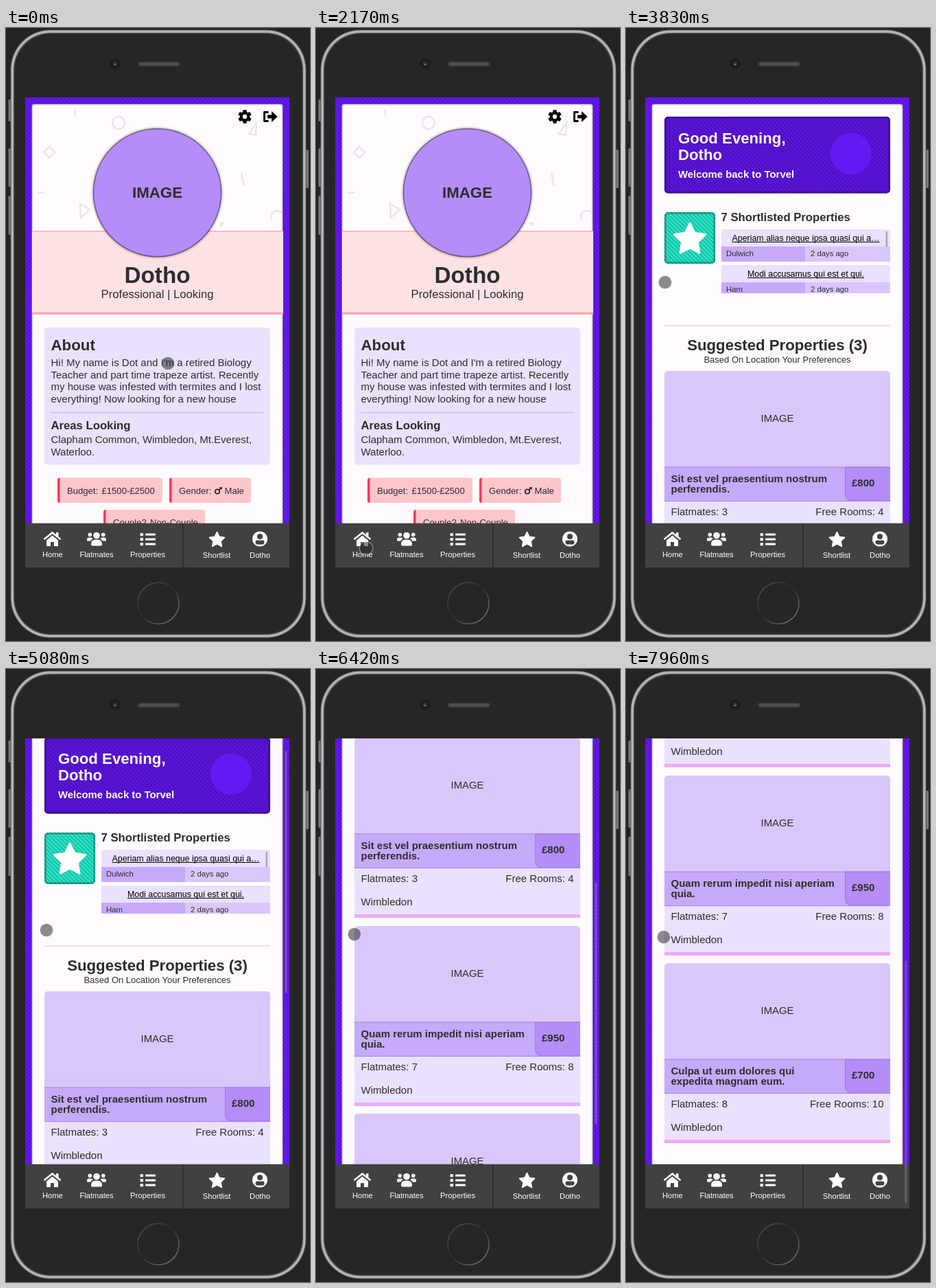
Write an HTML page with a canvas that moves like this. It is 443 by 892 pixels and loops after 8 s.

```html
<!DOCTYPE html>
<html lang="en">
<head>
<meta charset="utf-8">
<title>Flatmate app</title>
<style>
  html, body { margin: 0; width: 443px; height: 892px; overflow: hidden; background: #242424; }
  canvas { display: block; width: 443px; height: 892px; }
</style>
</head>
<body>
<canvas id="stage"></canvas>
<script>
const W = 443, H = 892, LOOP = 8000;
const canvas = document.getElementById('stage');
const dpr = window.devicePixelRatio || 1;
canvas.width = W * dpr;
canvas.height = H * dpr;
const c = canvas.getContext('2d');

const INK = '#2d2d2d', PAPER = '#fffbff', NAV = '#414141';
const PALE = '#eae1fe', LILAC = '#d9c7fc', MID = '#c6aafa', DEEP = '#b48df8';
const USER = 'Dotho';

const homes = [
  { title: ['Sit est vel praesentium nostrum', 'perferendis.'], price: '£800', mates: 3, rooms: 4 },
  { title: ['Quam rerum impedit nisi aperiam', 'quia.'], price: '£950', mates: 7, rooms: 8 },
  { title: ['Culpa ut eum dolores qui', 'expedita magnam eum.'], price: '£700', mates: 8, rooms: 10 }
];

// Pointer moves: start, end, from, control point, to
const moves = [
  [290, 540, 236, 488, 260, 515, 206, 535],
  [990, 1000, 206, 535, 209, 533, 212, 531],
  [1540, 2170, 212, 531, 330, 815, 73, 757],
  [2880, 3330, 73, 757, 130, 907, 218, 712],
  [3350, 3630, 218, 712, 165, 560, 107, 422],
  [3750, 3830, 107, 422, 80, 390, 57, 370],
  [4830, 5010, 57, 370, 58, 375, 59, 380],
  [6130, 6250, 59, 380, 57, 384, 56, 386],
  [7540, 7750, 56, 386, 55, 388, 55, 390]
];
// Scrolls: start, end, from, to
const scrolls = [[5012, 5330, 0, 246], [6200, 6580, 246, 493], [7520, 7680, 493, 618]];
// Scrollbar: shown at, fade start, fade end
const barTimes = [[2540, 2840, 3100], [5010, 5630, 5960], [6200, 6880, 7130], [7520, 7940, 8220]];

const clamp = v => Math.max(0, Math.min(1, v));
const smooth = p => p * p * (3 - 2 * p);

function pointerAt(t) {
  let m = moves[0];
  for (const n of moves) if (t >= n[0]) m = n;
  const p = smooth(clamp((t - m[0]) / (m[1] - m[0]))), q = 1 - p;
  return [0, 1].map(i => q * q * m[2 + i] + 2 * p * q * m[4 + i] + p * p * m[6 + i]);
}

function scrollAt(t) {
  let y = 0;
  for (const [a, b, from, to] of scrolls)
    if (t >= a) y = from + (to - from) * smooth(clamp((t - a) / (b - a)));
  return Math.round(y);
}

function barAlpha(t) {
  let a = 0;
  for (const [on, fade, off] of barTimes)
    if (t >= on) a = 1 - clamp((t - fade) / (off - fade));
  return a;
}

function rect(x, y, w, h, fill) {
  c.fillStyle = fill;
  c.fillRect(x, y, w, h);
}

function round(x, y, w, h, r, fill) {
  c.beginPath();
  c.roundRect(x, y, w, h, r);
  c.fillStyle = fill;
  c.fill();
}

function outline(x, y, w, h, r, color, lw) {
  c.beginPath();
  c.roundRect(x, y, w, h, r);
  c.strokeStyle = color;
  c.lineWidth = lw;
  c.stroke();
}

function clipTo(x, y, w, h) {
  c.save();
  c.beginPath();
  c.rect(x, y, w, h);
  c.clip();
}

function disc(x, y, r, fill) {
  c.beginPath();
  c.arc(x, y, r, 0, 7);
  c.fillStyle = fill;
  c.fill();
}

function ring(x, y, r, color, lw) {
  c.beginPath();
  c.arc(x, y, r, 0, 7);
  c.strokeStyle = color;
  c.lineWidth = lw;
  c.stroke();
}

function path(points, close) {
  c.beginPath();
  for (let i = 0; i < points.length; i += 2) c.lineTo(points[i], points[i + 1]);
  if (close) c.closePath();
}

function poly(points, fill) {
  path(points, true);
  c.fillStyle = fill;
  c.fill();
}

function line(points, color, lw, close) {
  path(points, close);
  c.strokeStyle = color;
  c.lineWidth = lw;
  c.stroke();
}

function text(s, x, y, size, { bold = false, color = INK, align = 'left', under = false } = {}) {
  c.font = `${bold ? 'bold ' : ''}${size}px "Liberation Sans", Arial, sans-serif`;
  c.textAlign = align;
  c.fillStyle = color;
  c.fillText(s, x, y);
  if (under) {
    const w = c.measureText(s).width;
    c.fillRect(align === 'center' ? x - w / 2 : x, y + 1, w, 1);
  }
}

function star(x, y, r, fill) {
  const pts = [];
  for (let i = 0; i < 10; i++) {
    const a = -Math.PI / 2 + i * Math.PI / 5, d = i % 2 ? r * 0.5 : r;
    pts.push(x + d * Math.cos(a), y + d * Math.sin(a));
  }
  c.lineJoin = 'round';
  poly(pts, fill);
  line(pts, fill, r * 0.14, true);
  c.lineJoin = 'miter';
}

// Fine diagonal weave laid over flat colours
const weave = (() => {
  const n = 6, tile = document.createElement('canvas');
  tile.width = tile.height = n;
  const g = tile.getContext('2d');
  [0.18, 0.18, 0.08].forEach((a, k) => {
    g.fillStyle = `rgba(0,0,0,${a})`;
    for (let i = 0; i < n; i++) g.fillRect((i + k) % n, i, 1, 1);
  });
  return c.createPattern(tile, 'repeat');
})();

function woven(x, y, w, h, r, fill, edge) {
  round(x, y, w, h, r, fill);
  round(x, y, w, h, r, weave);
  if (edge) {
    outline(x + 1.5, y + 1.5, w - 3, h - 3, r, edge, 3);
    outline(x + 0.5, y + 0.5, w - 1, h - 1, r, edge, 1);
  }
}

function phone() {
  rect(0, 0, W, H, '#242424');
  for (const [x, y, h] of [[3.5, 104, 32], [3.5, 175, 56], [3.5, 244, 57], [436, 177, 56]])
    round(x, y, 5, h, 1.5, '#777');
  round(6.5, 2.5, 431, 885, 58, '#5c5c5c');
  round(7.5, 3.5, 429, 883, 57, '#b3b3b3');
  round(11, 7, 422, 876, 54, '#484848');
  round(12.5, 8.5, 419, 873, 53, '#262626');
  disc(159, 52, 7.5, '#1c1c1e');
  disc(159, 52, 3.5, '#2e2f3c');
  disc(159, 53, 1.3, '#73747e');
  round(192, 49, 62, 7, 3.5, '#3a3a3a');
  round(194, 50.5, 58, 4, 2, '#505050');
  const g = c.createLinearGradient(200, 812, 246, 862);
  g.addColorStop(0, '#4c4c4c');
  g.addColorStop(0.45, '#2b2b2b');
  g.addColorStop(1, '#747474');
  ring(222, 837, 30, g, 1.6);
}

function backdrop(bottom) {
  woven(28, 101, 385, bottom, 0, '#6817f8');
  round(37.5, 110.5, 366, bottom, 4, PAPER);
  outline(38, 111, 365, bottom, 4, 'rgba(50,35,80,.16)', 3);
  outline(37.5, 110.5, 366, bottom, 4, 'rgba(50,35,80,.3)', 1.2);
}

function doodles() {
  const tint = '#ebe6eb';
  clipTo(38, 111, 364, 184);
  ring(164, 138, 9, tint, 2.5);
  line([101, 118, 101, 128], tint, 2.5);
  line([63, 172.5, 71.5, 181, 63, 189, 55, 181], tint, 2.5, true);
  line([108, 256, 122, 264, 109, 276], tint, 2.5, true);
  line([46, 240.5, 56, 239], tint, 2.5);
  line([343, 210, 346.5, 229], tint, 2.5);
  line([354, 154, 365, 138, 364, 156], tint, 2.5, true);
  line([312, 284, 316, 284, 314, 288], tint, 2, true);
  c.beginPath();
  c.arc(395, 275, 9, 2.6, 6.0);
  c.strokeStyle = tint;
  c.lineWidth = 2.5;
  c.stroke();
  c.restore();
}

function gear(x, y) {
  c.save();
  c.translate(x, y);
  disc(0, 0, 7.4, '#000');
  for (let i = 0; i < 6; i++) {
    round(-2.6, -9.8, 5.2, 6, 1, '#000');
    c.rotate(Math.PI / 3);
  }
  disc(0, 0, 3.2, PAPER);
  c.restore();
}

function signOut() {
  c.lineJoin = 'round';
  line([382.5, 122.5, 376.5, 122.5, 376.5, 135.5, 382.5, 135.5], '#000', 2.8);
  c.lineJoin = 'miter';
  rect(381, 126.5, 8, 5, '#000');
  poly([387, 121, 395.5, 129, 387, 137], '#000');
}

function chip(x, y, w) {
  round(x, y, w, 36.5, 4, '#ffc6cb');
  round(x, y, 3.5, 36.5, [4, 0, 0, 4], '#ff3558');
}

function profile() {
  backdrop(640);
  doodles();
  gear(348, 129);
  signOut();
  rect(38, 295, 366, 122, '#ffe2e4');
  rect(38, 295, 366, 1.3, '#f9a3b1');
  rect(38, 413.5, 366, 3.5, '#ffa9b4');

  c.save();
  c.shadowColor = 'rgba(0,0,0,.75)';
  c.shadowBlur = 4 * dpr;
  disc(220.5, 239.7, 93, DEEP);
  c.restore();
  ring(220.5, 239.7, 93, 'rgba(40,25,60,.55)', 1.2);
  text('IMAGE', 220.5, 247, 22.3, { bold: true, align: 'center' });
  text(USER, 220.5, 371, 33.3, { bold: true, align: 'center' });
  text('Professional | Looking', 220.5, 393, 16.7, { align: 'center' });

  round(56, 436, 329, 199.5, 5, PALE);
  text('About', 65.5, 469, 22.3, { bold: true });
  ["Hi! My name is Dot and I'm a retired Biology",
   'Teacher and part time trapeze artist. Recently',
   'my house was infested with termites and I lost',
   'everything! Now looking for a new house'
  ].forEach((s, i) => text(s, 65.5, 492 + i * 17.6, 15));
  rect(65.5, 558.5, 310.5, 2.5, LILAC);
  text('Areas Looking', 65.5, 584, 16.7, { bold: true });
  text('Clapham Common, Wimbledon, Mt.Everest,', 65.5, 604, 15);
  text('Waterloo.', 65.5, 622, 15);

  chip(75, 654.5, 153);
  text('Budget:', 89, 678, 13.1);
  text('£1500-£2500', 139.5, 678, 13.1);
  chip(238, 654.5, 119);
  text('Gender:', 252, 678, 13.1);
  ring(308, 674.5, 3.2, INK, 1.8);
  line([310.3, 672.2, 313.5, 669], INK, 1.8);
  poly([310.5, 668, 314.8, 668, 314.8, 672.3], INK);
  text('Male', 318.5, 678, 13.1);
  chip(142, 701, 148);
  text('Couple?', 156, 724, 13.1);
  text('Non-Couple', 210, 724, 13.1);
}

function shortlistItem(y, title, place) {
  round(139, y, 246, 25, [4, 4, 0, 0], PALE);
  rect(139, y + 25, 122, 22, MID);
  rect(261, y + 25, 124, 22, LILAC);
  text(title, 262, y + 17, 12.4, { color: '#000', align: 'center', under: true });
  text(place, 146, y + 39, 11.4);
  text('2 days ago', 269, y + 39, 11.3);
}

function homeCard(h, y) {
  round(56, y, 329, 140, [5, 5, 0, 0], LILAC);
  text('IMAGE', 220.5, y + 74, 14.9, { align: 'center' });
  rect(56, y + 140, 329, 49.5, MID);
  clipTo(56, y + 139, 329, 52);
  round(319, y + 140, 70, 49.5, [0, 0, 0, 9], DEEP);
  outline(319.5, y + 140, 70, 49.2, [0, 0, 0, 9], '#a27ae8', 1);
  c.restore();
  rect(56, y + 139.5, 329, 1, '#a680ea');
  rect(56, y + 189, 329, 1, '#a680ea');
  h.title.forEach((s, i) => text(s, 65.5, y + 162 + i * 15, 15, { bold: true }));
  text(h.price, 329, y + 168, 15, { bold: true });
  rect(56, y + 190, 329, 67, PALE);
  text('Flatmates: ' + h.mates, 65.5, y + 210, 15);
  text('Free Rooms: ' + h.rooms, 375.5, y + 210, 15, { align: 'right' });
  text('Wimbledon', 65.5, y + 244, 15);
  rect(56, y + 257, 329, 5, '#eeaaf9');
}

function home() {
  backdrop(1320);
  woven(56, 129, 329, 111.5, 5, '#5c14de', 'rgba(25,5,80,.3)');
  const white = { bold: true, color: '#fff' };
  text('Good Evening,', 76, 168, 22.2, white);
  text(USER, 76, 192, 22.2, white);
  text('Welcome back to Torvel', 76, 218, 14.9, white);
  disc(328, 183, 30, '#651af4');

  woven(56, 268, 74, 75, 5, '#27e3c6', 'rgba(0,70,70,.3)');
  star(93, 308, 23.5, '#fff');
  text('7 Shortlisted Properties', 138.5, 281, 16.7, { bold: true });
  clipTo(139, 293, 246, 93);
  shortlistItem(293, 'Aperiam alias neque ipsa quasi qui a…', 'Dulwich');
  shortlistItem(345, 'Modi accusamus qui est et qui.', 'Ham');
  rect(378.5, 296, 2.5, 22, '#aba6b3');
  c.restore();

  rect(56, 432, 329, 2, '#e7e0f7');
  text('Suggested Properties (3)', 220.5, 469, 22.2, { bold: true, align: 'center' });
  text('Based On Location Your Preferences', 220.5, 487, 13, { align: 'center' });
  homes.forEach((h, i) => homeCard(h, 499 + Math.round(i * 273.6)));
}

function houseIcon() {
  line([55.5, 744, 67.5, 734.5, 79.5, 744], '#fff', 2.6);
  rect(73, 734, 3.5, 6, '#fff');
  poly([59, 745.5, 67.5, 738.5, 76, 745.5, 76, 754, 70, 754, 70, 748, 65, 748, 65, 754, 59, 754], '#fff');
}

function usersIcon() {
  for (const x of [122.3, 141.7]) {
    disc(x, 737.3, 2.8, '#fff');
    round(x - 4.3, 741.5, 8.6, 5, [3, 3, 1, 1], '#fff');
  }
  disc(132, 738.5, 6, NAV);
  round(122.8, 743.2, 18.4, 11, 6, NAV);
  disc(132, 738.5, 4.8, '#fff');
  round(124, 744.5, 16, 9, [6, 6, 2, 2], '#fff');
}

function listIcon() {
  for (const y of [735, 742, 749]) {
    round(195.5, y, 4.5, 4.2, 1, '#fff');
    round(203, y + 0.6, 15, 3, 0.8, '#fff');
  }
}

function userIcon() {
  disc(370, 743.5, 11, '#fff');
  disc(370, 740, 4, NAV);
  round(363.5, 745.5, 13, 6, [4, 4, 6, 6], NAV);
}

function nav(pressed) {
  rect(28, 720.6, 385, 64.4, NAV);
  rect(257, 721, 2, 64, '#2f2f2f');
  const label = (s, x, y) => text(s, x, y, 11.2, { color: '#fff', align: 'center' });
  c.globalAlpha = pressed ? 0.75 : 1;
  houseIcon();
  label('Home', 67.8, 770);
  c.globalAlpha = 1;
  usersIcon();
  label('Flatmates', 132, 770);
  listIcon();
  label('Properties', 206.6, 770);
  star(307.5, 745, 11.6, '#fff');
  label('Shortlist', 307, 771);
  userIcon();
  label(USER, 370, 771);
}

function draw(t) {
  c.setTransform(dpr, 0, 0, dpr, 0, 0);
  phone();
  const y = scrollAt(t);
  clipTo(28, 101, 385, 684);
  c.save();
  c.translate(0, -y);
  if (t < 2540) profile();
  else home();
  c.restore();
  nav(t >= 2330 && t < 2540);
  c.globalAlpha = barAlpha(t);
  round(406.3, 104 + y * 0.518, 3.2, 352, 1.6, 'rgba(138,130,148,.55)');
  c.globalAlpha = 1;
  c.restore();
  const [px, py] = pointerAt(t);
  disc(px, py, 9.6, 'rgba(40,40,40,.54)');
  ring(px, py, 9.8, 'rgba(255,255,255,.35)', 1.4);
}

function tick() {
  draw(performance.now() % LOOP);
  requestAnimationFrame(tick);
}
tick();
</script>
</body>
</html>
```
